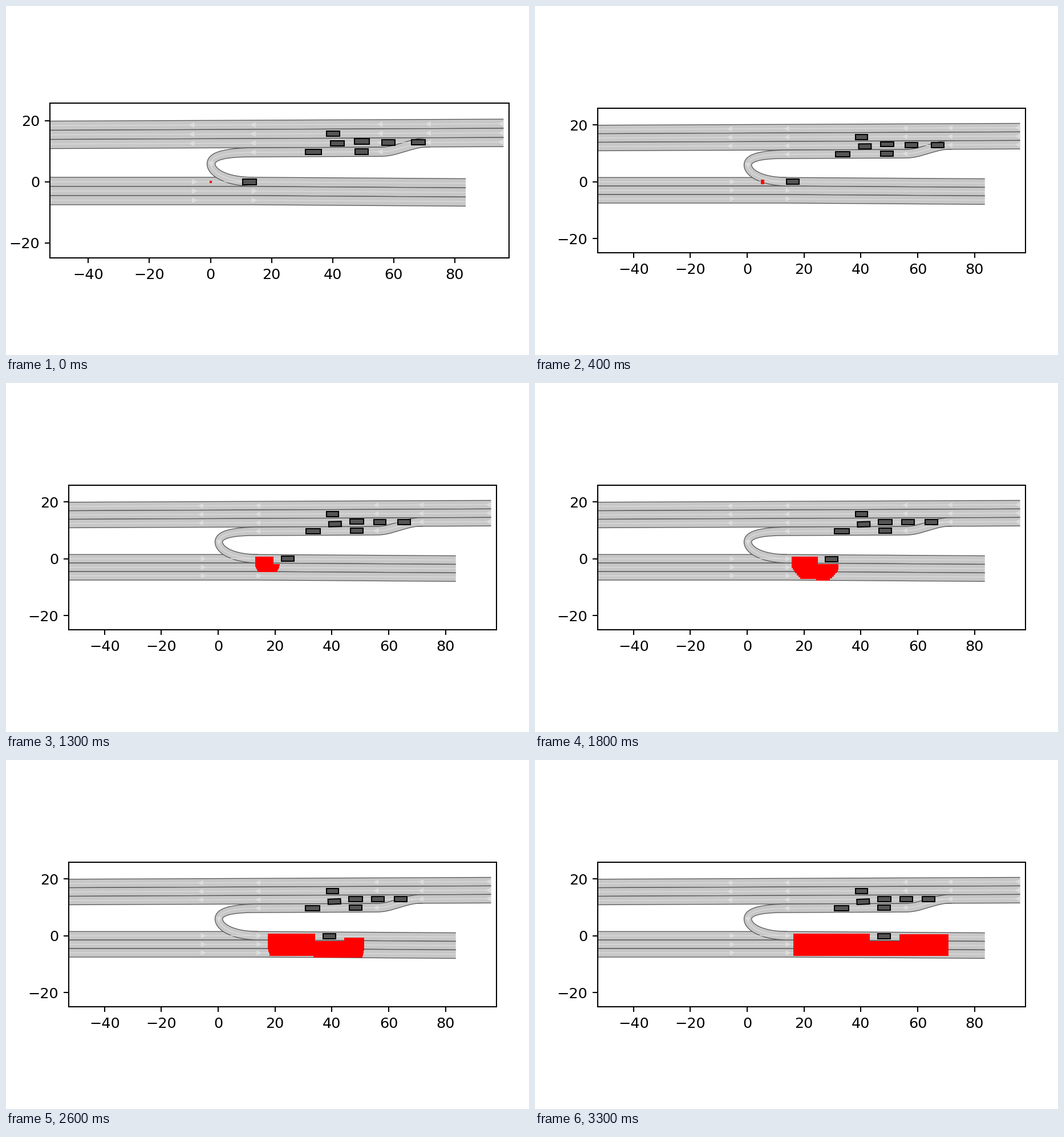
A matplotlib script that plays this animation: 917x611 px, repeating every 3400 ms.

```python
import numpy as np
import matplotlib.pyplot as plt
from matplotlib.animation import FuncAnimation
from matplotlib.patches import Polygon, Rectangle

W, H, DPI = 917, 611, 183.4
FRAMES = 34
XLIM, YLIM = (-52.6, 97.8), (-24.95, 25.83)
ROAD, EDGE, LIGHT, CAR = "#c7c7c7", "#555555", "#dddddd", "#555555"

plt.rcParams.update({"font.family": "DejaVu Sans", "font.size": 10})
fig = plt.figure(figsize=((W + 0.01) / DPI, (H + 0.01) / DPI), dpi=DPI,
                 facecolor="white")
ax = fig.add_axes([0.1, 0.1, 0.8, 0.8])
ax.set_xticks(range(-40, 81, 20))
ax.set_yticks(range(-20, 21, 20))


def place_axes(t):
    """The first layout is wider, then it settles."""
    left, right = (77, 882) if t == 0 else (110, 859.5)
    height = (right - left) * np.ptp(YLIM) / np.ptp(XLIM)
    ax.set_position([left / W, 0.5 - height / 2 / H,
                     (right - left) / W, height / H])


def lane(x, y, width=3.0):
    dx, dy = np.gradient(x), np.gradient(y)
    half = width / 2 / np.hypot(dx, dy)
    nx, ny = -dy * half, dx * half
    a, b = np.column_stack([x + nx, y + ny]), np.column_stack([x - nx, y - ny])
    ax.add_patch(Polygon(np.vstack([a, b[::-1]]), fc=ROAD, ec="none", zorder=2))
    for side in (a, b):
        ax.plot(*side.T, color=EDGE, lw=0.5, zorder=2, solid_capstyle="butt")
    ax.plot(x, y, color=LIGHT, lw=0.5, zorder=2.5, solid_capstyle="butt")


def arrow(x, y, dx, dy, length=1.9, half=0.88):
    """Triangle with its base at (x, y), pointing along (dx, dy)."""
    ax.add_patch(Polygon([(x - dy * half, y + dx * half),
                          (x + dx * length, y + dy * length),
                          (x + dy * half, y - dx * half)],
                         fc=LIGHT, ec="none", zorder=3))


def bezier(p0, p1, p2, p3, n=60):
    u = np.linspace(0, 1, n)[1:, None]
    p0, p1, p2, p3 = map(np.array, (p0, p1, p2, p3))
    return ((1 - u) ** 3 * p0 + 3 * u * (1 - u) ** 2 * p1
            + 3 * u ** 2 * (1 - u) * p2 + u ** 3 * p3)


def smoothstep(u):
    u = np.clip(u, 0, 1)
    return u * u * (3 - 2 * u)


def upper(x, k):
    return 18.6 - 3 * k + 0.0043 * x


def lower(x, k):
    return -3 * k - 0.0066 * np.maximum(x - 14, 0)


def draw_roads():
    x_up, x_low = np.linspace(-60, 96, 40), np.linspace(-60, 83.6, 40)
    for k in range(3):
        lane(x_up, upper(x_up, k))
        lane(x_low, lower(x_low, k))
        for x in (-5.3, 14.8, 56.4, 72.2, 96):
            arrow(x, upper(x, k), -1, 0)
        for x in (-6.1, 13.5):
            arrow(x, lower(x, k), 1, 0)

    # exit lane: leaves the upper road, runs beside it and turns back
    x = np.linspace(72, 13.9, 120)
    y = upper(x, 3) + 3 * smoothstep((x - 56) / 15)
    turn = np.vstack([bezier((13.9, 9.66), (6, 9.6), (0.2, 8.8), (0.2, 5.9)),
                      bezier((0.2, 5.9), (0.2, 3.1), (5, 0.1), (14, 0))])
    narrow = 0.35 * np.sin(np.linspace(0, np.pi, len(turn)))
    lane(np.r_[x, turn[:, 0]], np.r_[y, turn[:, 1]],
         3 - np.r_[0 * x, narrow])
    for x in (14.8, 56.4):
        arrow(x, upper(x, 3), -1, 0)
    arrow(0.25, 6.6, 0, -1)


class Car:
    def __init__(self, x, y, length=4.4, drift=0, turn=0):
        self.x, self.y, self.drift, self.turn = x, y, drift, turn
        self.box = ax.add_patch(Rectangle(
            (0, 0), length, 1.8, rotation_point="center",
            fc=CAR, ec="black", lw=0.8, zorder=5))

    def put(self, x, y, angle=0):
        self.box.set_xy((x - self.box.get_width() / 2,
                         y - self.box.get_height() / 2))
        self.box.set_angle(angle)

    def brake(self, t):
        """Cars further back in the queue roll further before they stop."""
        done = 1 - np.exp(-t / 18)
        roll = 0.6 * np.exp((self.x - 33.7) / 16)
        self.put(self.x - roll * done, self.y - self.drift * done,
                 self.turn * done)


def lead_x(t):
    return 12.75 + 0.79 * t + 0.0086 * t * t


def stairs(x, y, dx, dy, n=6):
    """Steps from (x, y + dy) down to (x + dx, y)."""
    u = np.linspace(0, 1, n + 1)
    xs = np.repeat(x + dx * u ** 1.4, 2)[1:]
    ys = np.repeat(y + dy * (1 - u), 2)[:-1]
    return list(zip(xs, ys))


def reach(t):
    """Reachable area: grows quadratically, kept on the road and off the car."""
    grow = 0.0253 * t * t
    left = -0.27 + 1.35 * t - 0.0257 * t * t
    right = 0.45 + 1.3 * t + grow
    top = min(0.72, 0.3 + grow)
    bottom = max(-7.6 if t < 31 else -7.1, -0.45 - grow)
    shelf = max(-7.05, bottom)
    back, front = lead_x(t) - 5, lead_x(t) + 5.3
    notch = -1.9

    # corners are cut most while the area spreads across the lanes
    depth = top - bottom
    rx = 0.35 * depth * np.exp(-((t - 18) / 6.5) ** 2)
    ry = 0.45 * depth * np.exp(-((t - 18) / 14) ** 2)

    pts = [(left, top)]
    if right <= back:
        pts.append((right, top))
    else:
        pts += [(back, top), (back, notch)]
        ahead = min(0.5, notch + 0.31 * (t - 22))
        if right > front and ahead > notch:
            pts += [(front, notch), (front, ahead), (right, ahead)]
        else:
            pts.append((right, notch))
    pts += stairs(right, bottom, -rx, ry)
    if bottom < shelf:
        pts += [(back - 0.6, bottom), (back - 0.6, shelf)]
    return pts + stairs(left, shelf, rx, ry)[::-1]


draw_roads()
area = ax.add_patch(Polygon(reach(0), fc="red", ec="none", zorder=4))
lead = Car(lead_x(0), 0)
parked = Car(40.2, 15.78)
parked.put(parked.x, parked.y)
queue = [
    Car(33.7, 9.75, length=5.1),
    Car(41.6, 12.55, drift=0.7, turn=3),
    Car(49.5, 9.82),
    Car(49.6, 13.28, length=4.7, drift=0.5),
    Car(58.3, 12.85),
    Car(68.05, 12.93),
]
ax.set(xlim=XLIM, ylim=YLIM)


def update(t):
    place_axes(t)
    area.set_xy(reach(t))
    lead.put(lead_x(t), -0.005 * (lead_x(t) - 14))
    for car in queue:
        car.brake(t)
    return [area, lead.box, *(car.box for car in queue)]


anim = FuncAnimation(fig, update, frames=FRAMES, interval=100,
                     repeat=True, repeat_delay=0, blit=False)
plt.show()
```
